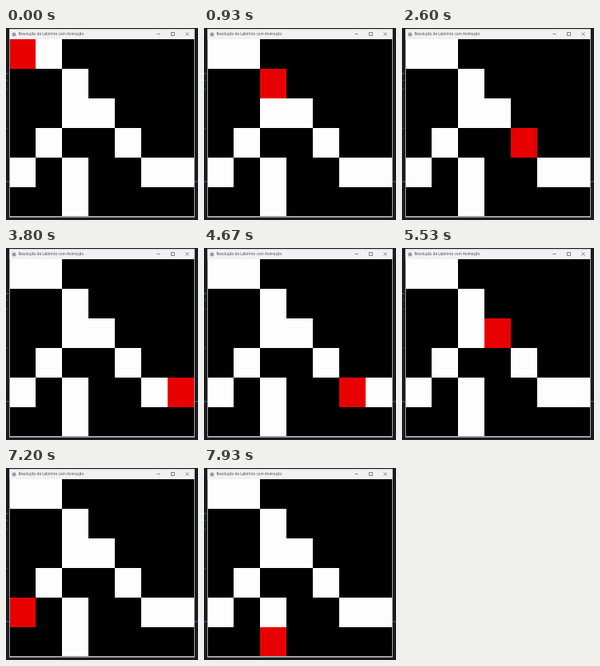
An HTML page for the animation above (8 s loop, 240x240 px).

```html
<!DOCTYPE html>
<html lang="pt">
<head>
<meta charset="utf-8">
<title>Labirinto</title>
<style>
  html, body { margin: 0; width: 100%; height: 100%; overflow: hidden; background: #1a1b1f; }
  svg { display: block; width: 100%; height: 100%; }
  text { font: 4.6px "Open Sans", "Noto Sans", sans-serif; fill: #444; }
</style>
</head>
<body>
<svg viewBox="0 0 240 240">
  <rect width="240" height="240" fill="#1a1b1f"/>
  <g fill="#34404f">
    <rect y="56" width="3" height="2"/>
    <rect y="65" width="3" height="1"/>
    <rect y="76" width="3" height="1"/>
    <rect y="125" width="3" height="1"/>
    <rect y="191" width="4" height="2" fill="#27466b"/>
    <rect x="236" y="191" width="4" height="2" fill="#27466b"/>
  </g>
  <rect x="4" y="1" width="232" height="236" fill="#a0a0a4"/>
  <rect x="4.5" y="1.5" width="231" height="12.5" fill="#f1f1f4"/>
  <circle cx="10" cy="8" r="2.5" fill="#9a9ca8"/>
  <text x="15.5" y="9.2">Resolução de Labirinto com Animação</text>
  <path d="M188.5 7.5h4M206.5 5.5h4v4h-4zM224.5 5.5l4 4m0-4l-4 4" fill="none" stroke="#555" stroke-width=".7"/>
  <g id="maze" shape-rendering="crispEdges"></g>
</svg>
<script>
const maze = [
  "..#####",
  "##.####",
  "##..###",
  "#.##.##",
  ".#.##..",
  "##.####"
];
// Depth-first walk as column-row pairs; dead ends are shown twice.
const walk = "00 10 21 22 32 43 54 64 64 54 43 32 13 04 04 24 25".split(" ");
const LOOP = 8000, STEP = 504, LEAD = 240;

const edgeX = col => Math.round(4.5 + col * 32.9);
const edgeY = row => Math.round(14 + row * 36.9);
const group = document.getElementById("maze");

function place(rect, col, row) {
  const box = {
    x: edgeX(col), y: edgeY(row),
    width: edgeX(col + 1) - edgeX(col),
    height: edgeY(row + 1) - edgeY(row)
  };
  for (const name in box) rect.setAttribute(name, box[name]);
}

function addCell(col, row, fill) {
  const rect = document.createElementNS("http://www.w3.org/2000/svg", "rect");
  rect.setAttribute("fill", fill);
  place(rect, col, row);
  return group.appendChild(rect);
}

maze.forEach((line, row) => [...line].forEach((mark, col) =>
  addCell(col, row, mark === "#" ? "#000" : "#fdfdfd")));
const walker = addCell(0, 0, "#e80000");

const start = performance.now();
function draw(now) {
  const time = Math.max(0, now - start) % LOOP;
  const index = Math.min(walk.length - 1, Math.floor((time + LEAD) / STEP));
  place(walker, +walk[index][0], +walk[index][1]);
  requestAnimationFrame(draw);
}
draw(start);
</script>
</body>
</html>
```
